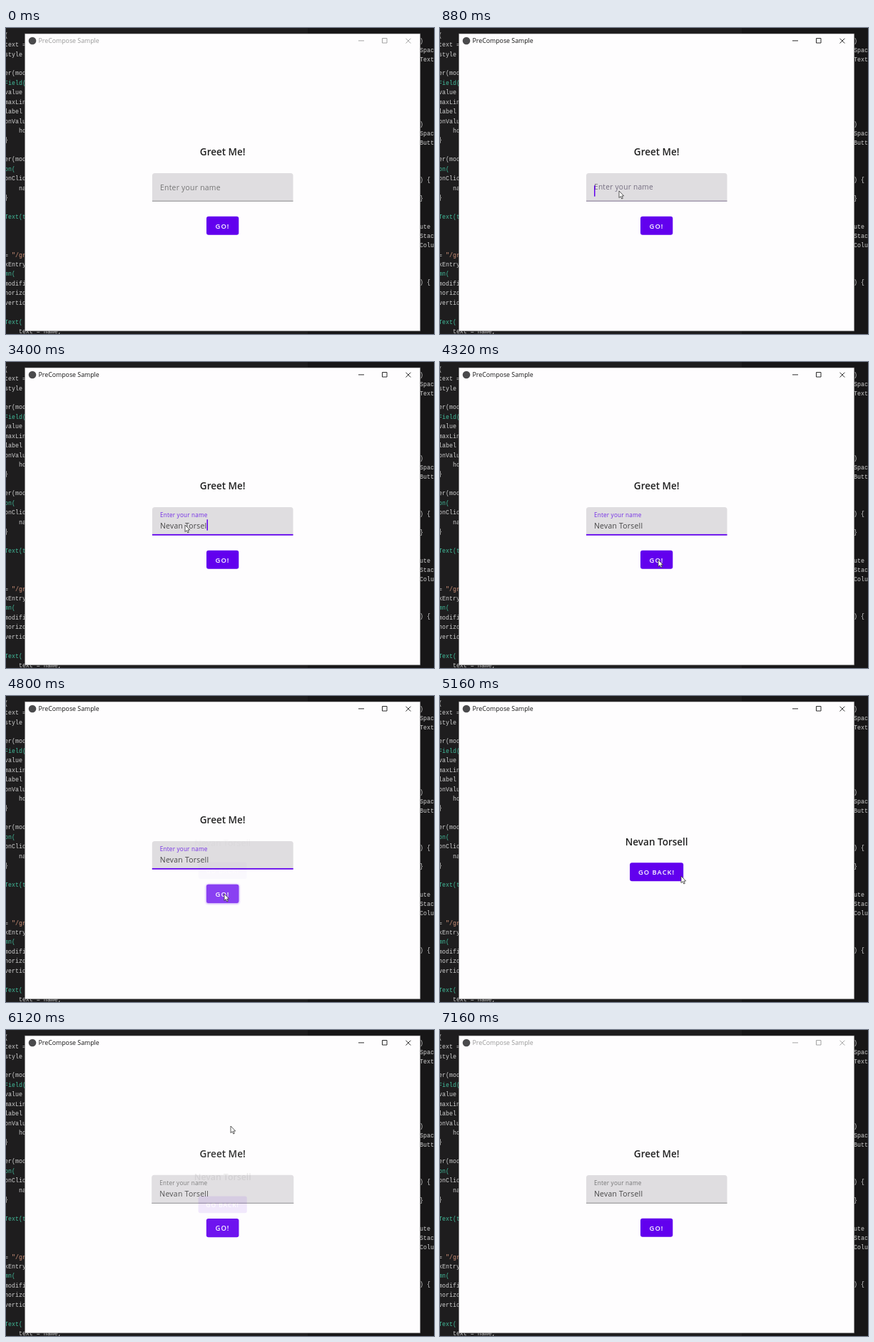
An HTML page for the animation above (7200 ms loop, 600 by 430 pixels).

```html
<!DOCTYPE html>
<html lang="en">
<head>
<meta charset="utf-8">
<title>PreCompose Sample</title>
<style>
html, body { margin: 0; width: 100%; height: 100%; overflow: hidden; background: #1b1a1b; }
svg { display: block; font-family: "Open Sans", "Noto Sans", sans-serif; }
text { white-space: pre; }
.code { font: 8.3px "Liberation Mono", "DejaVu Sans Mono", monospace; fill: #cfcfcf; }
.head { font-size: 13.5px; font-weight: 600; text-anchor: middle; fill: #222; }
.body { font-size: 10.4px; letter-spacing: .25px; }
.btn { font-size: 9.4px; font-weight: 600; letter-spacing: 1px; fill: #fff; }
.glow { fill: #6200ee; filter: blur(1.6px); }
</style>
</head>
<body>
<svg width="600" height="430" viewBox="0 0 600 430">
  <defs>
    <clipPath id="goClip"><rect x="281" y="264.8" width="45.3" height="26" rx="3"/></clipPath>
    <clipPath id="backClip"><rect x="266.1" y="234.2" width="75.1" height="26" rx="3"/></clipPath>
  </defs>
  <rect width="600" height="430" fill="#1e1d1e"/>
  <rect x="423" width="177" height="430" fill="#171617"/>
  <g id="code" class="code"></g>
  <rect x="26.3" y="8" width="554.5" height="417.9" fill="#fefdfe" stroke="#666" stroke-width=".6"/>
  <circle cx="37" cy="18" r="5.3" fill="#4a4a4c"/>
  <g id="bar">
    <text x="45.5" y="21.3" font-size="8.8">PreCompose Sample</text>
    <path d="M494 17.9h8M527.5 14.5h6.5v6.5h-6.5zM560.5 14.7l6.8 6.8m0-6.8l-6.8 6.8" fill="none" stroke="currentColor" stroke-width=".9"/>
  </g>

  <g id="form">
    <text class="head" x="303.7" y="179">Greet Me!</text>
    <path d="M205 243.5V207.5q0-3.5 3.5-3.5H399q3.5 0 3.5 3.5V243.5z" fill="#dfdde0"/>
    <rect id="line" x="205" width="197.5"/>
    <text id="label" class="body">Enter your name</text>
    <text id="input" class="body" x="216" y="233.6" fill="#444"></text>
    <rect id="caret" y="221.3" width="1.5" height="15.4" fill="#6200ee"/>
    <rect id="goGlow" class="glow" x="280.5" y="264.8" width="46.3" height="27" rx="3"/>
    <g clip-path="url(#goClip)">
      <rect x="280" y="264" width="48" height="28" fill="#6200ee"/>
      <circle id="goRipple" cx="306" cy="278" fill="#fff"/>
    </g>
    <text class="btn" x="293.6" y="281.9">GO!</text>
  </g>

  <g id="greet">
    <text id="who" class="head" x="303.7" y="209.6"></text>
    <rect id="backGlow" class="glow" x="265.6" y="234.2" width="76.1" height="27" rx="3"/>
    <g clip-path="url(#backClip)">
      <rect x="265" y="233" width="78" height="28" fill="#6200ee"/>
      <circle id="backRipple" cx="324" cy="250" fill="#fff"/>
    </g>
    <text class="btn" x="278" y="251.3">GO BACK!</text>
  </g>

  <path id="mouse" d="M0 0V9.6L2.2 7.6 3.8 11 5.3 10.3 3.8 7H6.7Z" fill="#fff" stroke="#333" stroke-width=".8" stroke-linejoin="round"/>
</svg>
<script>
const LOOP = 7200, STEP = 40;
const NAME = "Nevan Torsell";
const KEYS = [1600, 1880, 2040, 2200, 2260, 2600, 2840, 3000, 3080, 3120, 3200, 3400, 3820];
const FOCUS = 820, OPEN = 4790, BACK = 5910;
const MOVES = [
  [40, 566, 312], [760, 251, 229], [3440, 251, 229], [4080, 306, 278], [4880, 306, 278],
  [5120, 338, 253], [5400, 338, 253], [5520, 324, 250], [6000, 324, 250], [6240, 306, 20]
];

const $ = id => document.getElementById(id);
const set = (id, attrs) => { for (const k in attrs) $(id).setAttribute(k, attrs[k]); };
const clamp = v => Math.max(0, Math.min(1, v));
const mix = (a, b, p) => a + (b - a) * p;
const ease = (t, start, len) => { const p = clamp((t - start) / len); return p * p * (3 - 2 * p); };
const blend = (a, b, p) => `rgb(${a.map((v, i) => Math.round(mix(v, b[i], p)))})`;

// Critically damped spring, stiffness 400
function spring(ms) {
  if (ms <= 0) return 0;
  if (ms > 360) return 1;
  const w = ms / 50;
  return 1 - (1 + w) * Math.exp(-w);
}

// Code rows: [row, text, colour]
const TEAL = "#43bd9c", STRING = "#ce9178";
const LEFT = [
  [0, "("], [1, "text = "], [2, "style "], [4, "er(mod"], [5, "Field(", TEAL], [6, "value "], [7, "maxLin"],
  [8, "label "], [9, "onValu"], [10, "    ho"], [11, "}"], [13, "er(mod"], [14, "on(", TEAL], [15, "onClic"],
  [16, "    na"], [17, "}"], [19, "Text(t", TEAL], [23, "="], [23, "  \"/gr", STRING], [24, "kEntry"],
  [25, "mn(", TEAL], [26, "modifi"], [27, "horizo"], [28, "vertic"], [30, "Text(", TEAL], [31, "    text = name,"]
];
const RIGHT = [
  [0, ")"], [1, "Space"], [2, "Text("], [9, ")"], [10, "Space"], [11, "Butto"], [15, ") {"], [17, "}"],
  [20, "ute"], [21, "Stack"], [22, "Colum"], [26, ") {"]
];
function addCode(rows, x, y, pitch) {
  for (const [n, str, fill] of rows) {
    const el = document.createElementNS($("code").namespaceURI, "text");
    el.setAttribute("x", x);
    el.setAttribute("y", y + n * pitch);
    if (fill) el.style.fill = fill;
    el.textContent = str;
    $("code").append(el);
  }
}
addCode(LEFT, -2, 12.7, 13.43);
addCode(RIGHT, 580, 20.5, 13.05);
$("who").textContent = NAME;

function scene(id, alpha, scale) {
  set(id, {
    opacity: alpha,
    visibility: alpha > 0.004 ? "visible" : "hidden",
    transform: `translate(303.7 227) scale(${scale}) translate(-303.7 -227)`
  });
}

function press(name, t, down, up) {
  const held = clamp((t - down) / 75) * (1 - clamp((t - up) / 150));
  set(name + "Ripple", { r: mix(8, 62, ease(t, down, 200)), opacity: 0.24 * held });
  set(name + "Glow", { opacity: 0.4 * held });
}

function drawField(t) {
  const focused = t < BACK;
  const float = ease(t, FOCUS + 20, 200);
  const tint = focused ? float : 0;
  const size = mix(1, 0.785, float);
  set("label", {
    transform: `translate(216 ${mix(228, 218.4, float)}) scale(${size})`,
    fill: blend([117, 117, 117], [116, 45, 230], tint)
  });
  const thick = mix(1, 1.8, tint);
  set("line", { y: 243.7 - thick, height: thick, fill: blend([139, 138, 141], [98, 0, 238], tint) });

  const count = KEYS.filter(k => k <= t).length;
  $("input").textContent = NAME.slice(0, count);
  const last = count ? KEYS[count - 1] : FOCUS;
  const lit = t >= FOCUS && t < OPEN && (t - last) % 1000 < 500;
  set("caret", {
    x: 216 + (count ? $("input").getComputedTextLength() : 0),
    visibility: lit ? "inherit" : "hidden"
  });
}

function drawMouse(t) {
  const i = MOVES.findIndex(m => m[0] > t);
  const shown = i > 0;
  set("mouse", { visibility: shown ? "visible" : "hidden" });
  if (!shown) return;
  const [t0, x0, y0] = MOVES[i - 1], [t1, x1, y1] = MOVES[i];
  const p = ease(t, t0, t1 - t0);
  set("mouse", { transform: `translate(${mix(x0, x1, p)} ${mix(y0, y1, p)})` });
}

function draw(t) {
  const active = t >= FOCUS && t < 7120;
  set("bar", { fill: active ? "#151515" : "#999", color: active ? "#151515" : "#999" });
  const p = spring(t - OPEN) - spring(t - BACK);
  scene("form", 1 - p, 1 + 0.1 * p);
  scene("greet", p, 0.9 + 0.1 * p);
  drawField(t);
  press("go", t, 4640, 4800);
  press("back", t, 5700, 5920);
  drawMouse(t);
}

const start = performance.now();
function tick() {
  const t = (performance.now() - start) % LOOP;
  draw(Math.floor(t / STEP) * STEP);
  requestAnimationFrame(tick);
}
draw(0);
requestAnimationFrame(tick);
</script>
</body>
</html>
```
